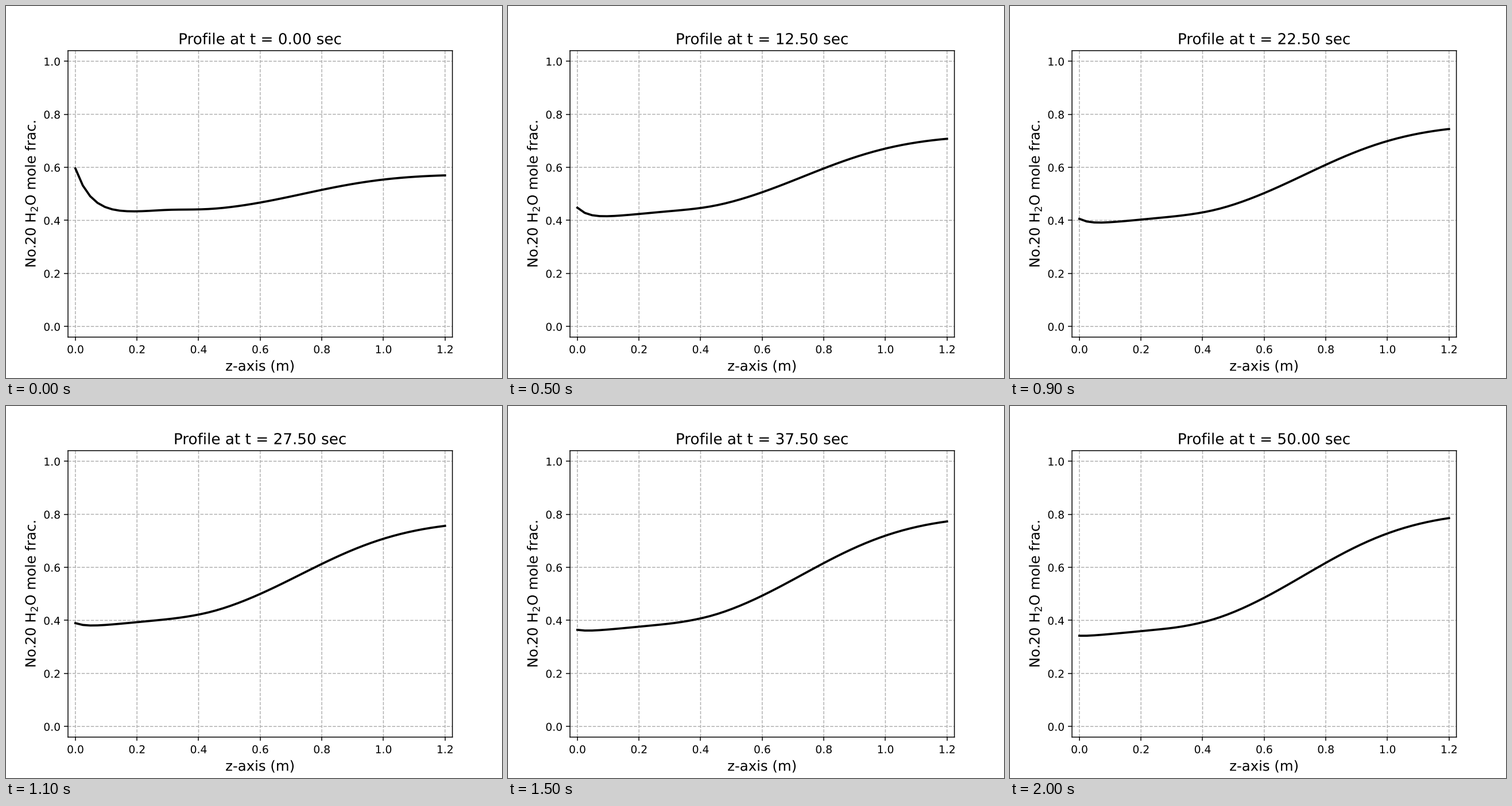
Animation, 864 px wide and 648 px high, one loop 2.1 s. Source, as a matplotlib script:

```python
import numpy as np
import matplotlib.pyplot as plt
from matplotlib.animation import FuncAnimation
from matplotlib.patheffects import Normal

FRAMES = 21
DT = 2.5        # simulated seconds per step
LENGTH = 1.2    # column length, m

# Keep lines and glyph outlines at their exact sub-pixel positions
plt.rcParams["path.snap"] = False
plt.rcParams["path.effects"] = [Normal()]

z = np.linspace(0, LENGTH, 51)


def step(center, width):
    return 1 / (1 + np.exp(-(z - center) / width))


def bell(center, width):
    return np.exp(-((z - center) / width) ** 2)


def integrate(slope):
    area = (slope[1:] + slope[:-1]) / 2 * np.diff(z)
    return np.concatenate([[0], np.cumsum(area)])


def settle(t, tau):
    return 1 - np.exp(-t / tau)


# Starting profile: a short ramp, then a shallow rise
start = .4068 + integrate(.112 * (1 - step(.3, .02))
                          + .25 * bell(.74, .33) * step(.42, .03))
# Shape of the rise that builds up towards the outlet
rise = integrate(1.49 * bell(.72, .45) * step(.3, .02))


def profile(t):
    level = .035 * settle(t, 5) - .16 * settle(t, 47)
    gain = .054 * settle(t, 5.5) + .294 * settle(t, 32)
    # Inlet layer that fades and narrows with time
    height = .095 * np.exp(-t / 17) + .094 * np.exp(-t / 2.56)
    depth = .034 + .021 * np.exp(-t / 6)
    return start + level + gain * rise + height * np.exp(-z / depth)


fig, ax = plt.subplots(figsize=(6.4, 4.8), dpi=135)
curve, = ax.plot(z, profile(0), color="black", linewidth=2)
title = ax.set_title("", fontsize=14)
ax.set_xlabel("z-axis (m)", fontsize=13)
ax.set_ylabel("No.20 H$_2$O mole frac.", fontsize=13)
ax.set_xlim(-.02 * LENGTH, 1.02 * LENGTH)
ax.set_ylim(-.04, 1.04)
ax.grid(linestyle="--")


def update(k):
    t = k * DT
    curve.set_ydata(profile(t))
    title.set_text(f"Profile at t = {t:.2f} sec")
    return curve, title


anim = FuncAnimation(fig, update, frames=FRAMES, interval=100, repeat=True)
plt.show()
```
